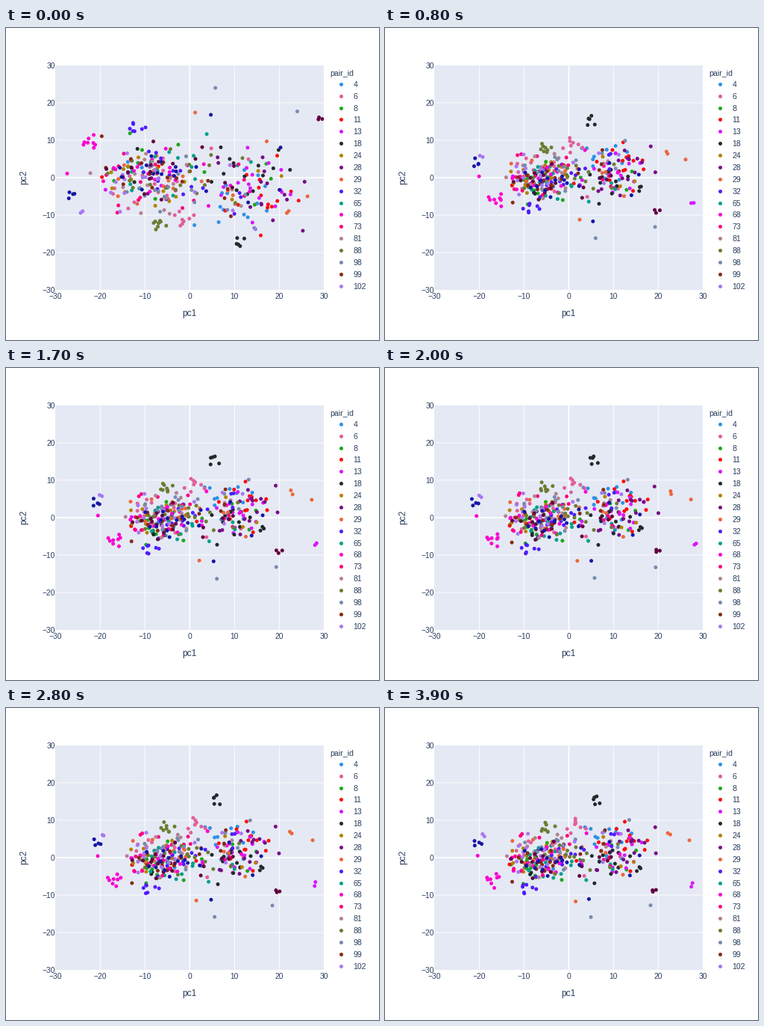
Write a matplotlib script that moves like this. It is 500 by 417 pixels and loops after 4 s.

```python
import numpy as np
import matplotlib.pyplot as plt
from matplotlib.animation import FuncAnimation
from matplotlib.patches import Rectangle

W, H, DPI = 500, 417, 100
FRAMES, INTERVAL = 40, 100
INK, PANEL = "#2a3f5f", "#e5e9f4"
LEFT, TOP, PW, PH = 66.4, 50, 360, 300
PER_PAIR = 17
RIGHT_HEAVY = {0, 3, 4, 5, 7}

COLORS = ("#2E91E5 #E15F99 #1CA71C #FB0D0D #DA16FF #222A2A #B68100 #750D86 "
          "#EB663B #511CFB #00A08B #FB00D1 #FC0080 #B2828D #6C7C32 #778AAE "
          "#862A16 #A777F1 #620042 #1616A7").split()
IDS = "4 6 8 11 13 18 24 28 29 32 65 68 73 81 88 98 99 102".split()

# Knots away from the lobes: pair, count, settled centre, initial centre
KNOTS = [
    (5, 5, (5, 15.2), (10.5, -17)),
    (15, 1, (5.7, -16.1), (5.7, 24)),
    (15, 1, (19, -13.1), (24, 17.7)),
    (8, 2, (22.3, 6.7), (21.5, -9.3)),
    (8, 1, (27.3, 4.7), (26.3, -5)),
    (8, 1, (1.8, -11.5), (1.2, 17.4)),
    (4, 2, (28.8, -7), (21, -3.7)),
    (19, 4, (-21.2, 4.1), (-26.7, -4.7)),
    (19, 1, (5, -11.6), (4.7, 16.8)),
    (11, 1, (-20.6, 0.4), (-27.4, 1.1)),
    (11, 8, (-16.6, -6.5), (-22, 10)),
    (17, 2, (-20, 5.8), (-24.5, -9.1)),
    (18, 3, (19, -8.7), (28.3, 15.5)),
    (1, 8, (1.1, 9.2), (-1.5, -11.5)),
    (9, 7, (-9, -8), (-12, 13)),
    (14, 8, (-4.8, 7.7), (-6.5, -12.2)),
]


def build_cloud(rng):
    """Return pair index, settled points and initial points, in drawing order."""
    pair, settled, initial = [], [], []

    def add(i, points, first):
        pair.extend([i] * len(points))
        settled.append(points)
        initial.append(first)

    def lobe(i, n, centre, spread):
        middle = centre + rng.normal(0, 1, 2)
        points = middle + rng.triangular(-2.3, 0, 2.3, (n, 2)) * spread
        first = points * (1.35, -1.4) - (1, 0) + rng.normal(0, 1.5, (n, 2))
        add(i, points, first)

    for i in range(len(COLORS)):
        n_right = round(PER_PAIR * (0.8 if i in RIGHT_HEAVY else 0.2))
        lobe(i, PER_PAIR - n_right, (-5.5, -0.3), (4.4, 2.9))
        lobe(i, n_right, (10.2, 0.8), (3.3, 3.6))
        for owner, n, centre, start in KNOTS:
            if owner == i:
                scatter = rng.triangular(-1, 0, 1, (n, 2)) * np.sqrt(n - 1)
                add(i, centre + scatter, start + scatter * (1, -1))
    return pair, np.vstack(settled), np.vstack(initial)


def build_path(rng, settled, initial):
    """Mirrored first step, quick settling, then a slow shear with jitter."""
    drift = rng.normal(0, 0.25, settled.shape)
    path = [initial]
    x, y = settled.T
    for k in range(1, FRAMES):
        u = (k - 23) / 27
        squeeze = np.exp(-k / 5)
        pos = np.column_stack([
            (x + u * (0.07 * y - 0.03 * x)) * (1 - 0.2 * squeeze),
            y * (1 - 0.03 * u) * (1 - 0.12 * squeeze),
        ])
        pull = np.exp(-k / 1.2)
        pos = pos * (1 - pull) + initial * (1, -1) * pull
        path.append(pos + u * drift + rng.normal(0, 0.13, settled.shape))
    return path


def to_px(points):
    return (LEFT, TOP) + (points * (1, -1) + 30) * (6, 5)


rng = np.random.default_rng(12)
pair, settled, initial = build_cloud(rng)
path = build_path(rng, settled, initial)

plt.rcParams["font.family"] = "Liberation Sans"
fig = plt.figure(figsize=(W / DPI, H / DPI), dpi=DPI, facecolor="white")
ax = fig.add_axes([0, 0, 1, 1])
ax.set_xlim(0, W)
ax.set_ylim(H, 0)
ax.axis("off")


def label(x, y, text, size=10.3, ha="center", va="center_baseline", **kw):
    ax.text(x, y, text, size=size * 72 / DPI, color=INK, ha=ha, va=va, **kw)


panel = Rectangle((LEFT, TOP), PW, PH, fc=PANEL, lw=0, zorder=0)
ax.add_patch(panel)

for v in range(-30, 31, 10):
    gx, gy = to_px(np.array([v, v]))
    if abs(v) < 30:
        style = dict(color="white", zorder=1, snap=False,
                     lw=(1.7 if v == 0 else 0.9) * 72 / DPI)
        ax.plot([gx, gx], [TOP, TOP + PH], **style)
        ax.plot([LEFT, LEFT + PW], [gy, gy], **style)
    text = str(v).replace("-", "\u2212")
    label(gx, 357.5, text)
    label(LEFT - 0.6, gy, text, ha="right")

label(246.3, 381, "pc1", 12)
label(24, 199.5, "pc2", 12, rotation=90, va="center")
label(434, 59.6, "pair_id", 10.5, ha="left")

DOT = (5 * 72 / DPI) ** 2
for i, name in enumerate(IDS):
    y = 74.9 + 15.86 * i
    ax.scatter(449.4, y, s=DOT, c=COLORS[i], lw=0)
    label(465.7, y, name, 10.5, ha="left")

dots = ax.scatter(*to_px(path[0]).T, s=DOT, c=[COLORS[i] for i in pair], lw=0, zorder=2)
dots.set_clip_path(panel)


def update(k):
    dots.set_offsets(to_px(path[k]))
    return (dots,)


anim = FuncAnimation(fig, update, frames=FRAMES, interval=INTERVAL,
                     repeat=True, repeat_delay=0, blit=False)
plt.show()
```
